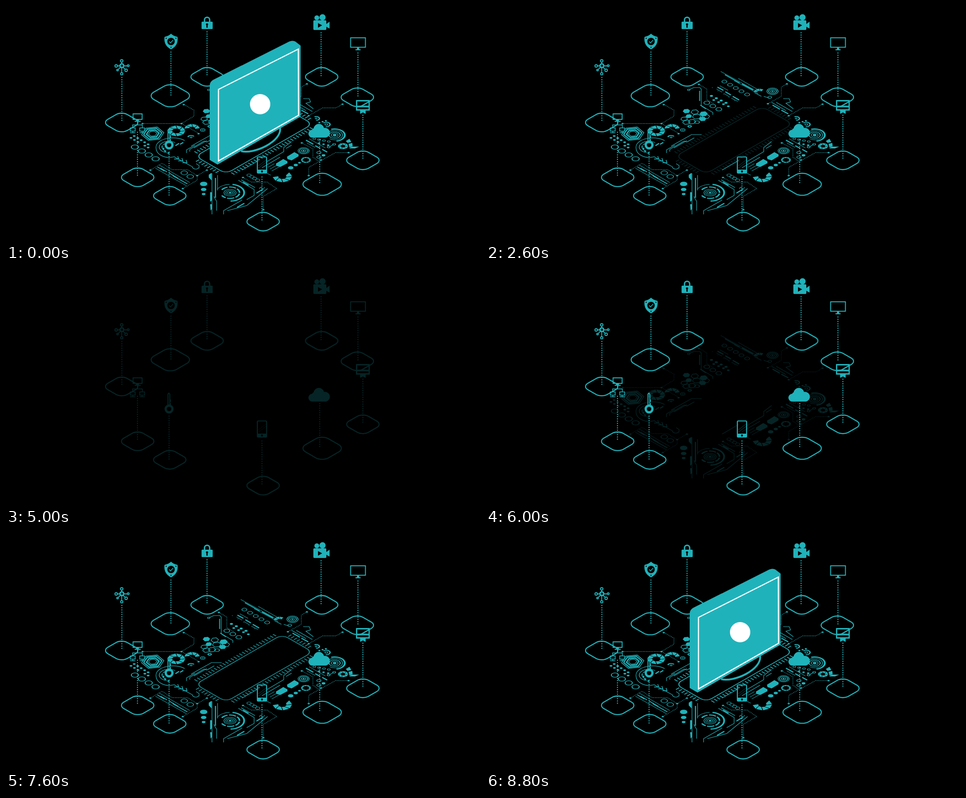
Animation, 1024 px wide and 512 px high, one loop 9300 ms. Source, as an HTML page:

```html
<!DOCTYPE html>
<html lang="en">
<head>
<meta charset="utf-8">
<title>Isometric circuit</title>
<style>
  html, body { margin: 0; width: 100%; height: 100%; overflow: hidden; background: #000; }
  svg { display: block; width: 100%; height: 100%; }
</style>
</head>
<body>
<svg id="stage" viewBox="0 0 1024 512"></svg>
<script>
const TEAL = '#20b2ba';

// Drawing helpers, each returning SVG markup
const line = (d, w = 1.2, extra = '') =>
  `<path d="${d}" fill="none" stroke="${TEAL}" stroke-width="${w}" ${extra}/>`;
const fill = (d, color = TEAL) => `<path d="${d}" fill="${color}"/>`;
const disc = (x, y, r, color = TEAL) => `<circle cx="${x}" cy="${y}" r="${r}" fill="${color}"/>`;
const hoop = (x, y, r, w) =>
  `<circle cx="${x}" cy="${y}" r="${r}" fill="none" stroke="${TEAL}" stroke-width="${w}"/>`;
const flat = (x, y, body) => `<g transform="translate(${x} ${y}) scale(1 .6)">${body}</g>`;
const spot = (x, y, r) => flat(x, y, disc(0, 0, r));
const ring = (x, y, r, w = 1.6) => flat(x, y, hoop(0, 0, r, w));
const arc = (x, y, r, w, from, to, dash = '') => {
  const at = deg => {
    const a = deg * Math.PI / 180;
    return `${(r * Math.cos(a)).toFixed(2)} ${(r * Math.sin(a)).toFixed(2)}`;
  };
  const large = to - from > 180 ? 1 : 0;
  return flat(x, y, line(`M${at(from)}A${r} ${r} 0 ${large} 1 ${at(to)}`, w, `stroke-dasharray="${dash}"`));
};
// Ring of slanted blades, like a camera aperture
const aperture = (x, y, inner, outer, count, first = 0, last = count) => {
  const at = (r, i) => {
    const a = i / count * 2 * Math.PI;
    return `${(r * Math.cos(a)).toFixed(1)} ${(r * Math.sin(a)).toFixed(1)}`;
  };
  let d = '';
  for (let i = first; i < last; i++)
    d += `M${at(outer, i)}L${at(outer, i + .88)} ${at(inner, i + 1.2)} ${at(inner, i + .35)}z`;
  return flat(x, y, fill(d));
};
const row = (n, x, y, dx, dy, draw) =>
  Array.from({ length: n }, (_, i) => draw(x + dx * i, y + dy * i)).join('');
const each = (points, draw) => points.map(p => draw(...p)).join('');
const hex = (x, y, r, w = 0) => {
  const d = `M${x - r} ${y + r * .1}l${r * .4} ${-r * .6} ${r} ${-r * .1} ${r * .6} ${r * .5} ${-r * .4} ${r * .6} ${-r} ${r * .1}z`;
  return w ? line(d, w) : fill(d);
};
const trace = (d, ...ends) =>
  line(d, 1.3, 'stroke-dasharray="1.4 2"') + each(ends, (x, y) => spot(x, y, 2.6));

// Icons, their stems and landing pads
const pad = (x, y, side, r) =>
  `<rect x="${-side / 2}" y="${-side / 2}" width="${side}" height="${side}" rx="${r}" fill="none"
    stroke="${TEAL}" stroke-width="2.3" vector-effect="non-scaling-stroke"
    transform="matrix(.866 .5 -.866 .5 ${x} ${y})"/>`;
const stem = (x, top, bottom) =>
  line(`M${x} ${top}V${bottom}`, 2.5, 'stroke-linecap="round" stroke-dasharray="0 4.9"');

const pads =
  each([[434.5, 153.7], [250, 252.7], [284.5, 371.7], [353.8, 411.8], [555.5, 467.8], [771, 334.8], [759, 198], [682, 153.7]],
    (x, y) => pad(x, y, 48.6, 14)) +
  each([[355, 194.8], [683, 386.8]], (x, y) => pad(x, y, 57.2, 16)) +
  each([[434.3, 56, 154], [356.3, 100, 198], [250.3, 155, 253], [284, 274, 371], [352.3, 317, 414],
    [553, 371, 468], [677.7, 290, 387], [771, 237, 335], [760.3, 102, 199], [680.7, 58, 155]], stem);

const lock = line('M428.8 36v-6a5.6 5.6 0 0 1 11.2 0v6', 3) +
  fill('M424 34h21q1.5 0 1.5 1.5v13q0 1.5-1.5 1.5h-21q-1.5 0-1.5-1.5v-13q0-1.5 1.5-1.5z') +
  disc(434.3, 40, 2.4, '#000') + fill('M433.3 40h2l.5 7h-3z', '#000');

const shield = fill('M356.5 60Q361 65 370.5 67Q373 86 356.5 94Q340 86 342.5 67Q352 65 356.5 60z') +
  disc(356.5, 77, 8, '#000') + line('M352.5 77l3 3 5.5-6', 1.6) +
  each([[346, 70], [367, 70], [356.5, 89.5]], (x, y) => disc(x, y, 1.2, '#000'));

const network = hoop(250.3, 129.5, 4, 3) +
  line('M250 122v4M241 130h5M254 130h8M247 133l-4 4M253 133l4 4M250 134v10', 1.8) +
  each([[250, 119, 2.7], [238, 130, 2.7], [264, 129.5, 2], [241, 139, 1.8], [259.5, 139.5, 2.7], [250, 147, 2.5]],
    (x, y, r) => hoop(x, y, r, 2));

const camera = disc(671.5, 25.5, 5.3) + disc(683.8, 24.5, 6.7) +
  fill('M666 31h24q2 0 2 2v17q0 2-2 2h-24q-2 0-2-2v-17q0-2 2-2zM692 39l7-5v15l-7-4z') +
  fill('M674 37l9 5-9 5z', '#000');

const television = line('M744.5 69h32v20.5h-32z', 2) + fill('M758 90h5v4h3v2h-11v-2h3z');

const certificate = line('M757.5 205.5h27v20h-27z', 2.8) + line('M757 218h28', 3.5) +
  line('M767 217l17-10', 1.3) + fill('M765 225h12v9l-6-3-6 3z');

const computers = line('M274.5 234h19.5v12h-19.5z', 1.9) + fill('M281 247h6v2h4v2h-13v-2h3z') +
  line('M284 251v7M273.5 264v-6h21v6M268.5 264.5h10.5v7h-10.5zM289 264.5h10.5v7h-10.5z', 1.6) +
  line('M268 275h11.5M288.5 275h11.5M274 272v3M294 272v3', 1.5);

const key = hoop(352.3, 301.5, 7.3, 5) +
  line('M350 294v-25l2-2 2 3v24', 2) + line('M355 281v5M355 289v4', 2);

const phone = line('M545 327.5h16q2 0 2 2v31q0 2-2 2h-16q-2 0-2-2v-31q0-2 2-2z', 2.2) +
  fill('M542 355h22v7h-22z') + disc(553, 359, 2.2, '#000') +
  line('M545 347l17-13M545 352l17-13', .4);

const cloud = fill('M662 285.5a8.5 8.5 0 0 1-.5-17a4 4 0 0 1 3-3a11.5 11.5 0 0 1 22.5-1a10.5 10.5 0 0 1 4 21z');

const icons = pads + lock + shield + network + camera + television + certificate + computers + key + phone + cloud;

// Circuit board, by region
const traces =
  trace('M385 214L406 226V239L379 255', [384, 214], [379, 255]) +
  trace('M295 255H379L416 276', [295, 255], [416, 277]) +
  trace('M460 170L477 180V203L492 212', [460, 170]) +
  trace('M650 169L638 176V196L609 212', [650, 169], [609, 212]) +
  trace('M727 213L713 221H684L654 238', [727, 213], [654, 238]) +
  trace('M312 356L337 341L359 355H392L413 368L434 356', [312, 356], [413, 368], [434, 356]) +
  trace('M382 396L413 378V368', [382, 396]) +
  trace('M512 372L530 382H564L585 396L556 413V442', [512, 372], [556, 442]) +
  trace('M639 297L663 310V328L677 338', [639, 297]) +
  trace('M740 318H712L654 350V368', [740, 318], [654, 368]);

const topLeft =
  line('M507 142L580 182M545 157L592 184M536 162L588 190', 1) + line('M516 149L548 167M553 169L577 182', 2) +
  line('M580 188L595 196M600 196L612 200') + ring(613, 198, 4) +
  row(5, 515, 164, 12.3, 7, (x, y) => ring(x, y, 5.3)) +
  line('M500 176L513 183M517 186L529 193M533 196L547 204', 2.5) +
  line('M505 173L523 183M498 180L510 187M514 190L526 197M530 200L544 207', 1) +
  row(4, 487, 195, 10.5, 5, (x, y) => spot(x, y, 3.4)) + row(4, 492, 204, 10.5, 4.5, (x, y) => spot(x, y, 3)) +
  row(5, 489, 177, 12, 7, (x, y) => spot(x, y, 1)) +
  row(3, 477, 210, 13, 7, (x, y) => ring(x, y, 6.3)) +
  ring(438, 182, 2.5) + line('M440 181L449 177H462L465 180V216L490 231V236') +
  line('M461.5 184V206M463 215L475 223', 2) +
  aperture(591, 187, 5, 13, 8, 4, 7) +
  each([[12, 1.5], [8.5, 2], [4.5, 1.5]], (r, w) => ring(619, 185, r, w)) + spot(619, 185, 2) +
  line('M627 209L662 229M617 209L648 227M642 201H655L658 208L648 211L664 223') +
  line('M619 215L635 224M638 226L653 234', 2.3);

const hexagons =
  each([[433, 228, 8], [470, 234, 9], [438, 239, 7], [468, 245, 8]], (x, y, r) => hex(x, y, r)) +
  each([[451, 230, 8], [455, 240, 9], [428, 245, 7], [475, 240, 8], [433, 252, 8], [445, 251, 8]],
    (x, y, r) => hex(x, y, r, 1.3)) +
  ring(456, 252, 5, 2) + ring(440, 261, 3.5, 2.5) + ring(425, 269, 5, 1.5) + ring(425, 269, 2, 1);

const left =
  hex(317, 277, 24, 1.5) + hex(317, 277, 19.5, 2.4) + hex(317, 277, 13.5, 2.8) + hex(317, 277, 9, 1.3) +
  aperture(368, 271, 9, 19.5, 8) +
  aperture(402, 266, 7, 17, 8, 4, 8) +
  arc(400, 285, 7, 3, 190, 330) + ring(400, 285, 2, 1.5) +
  row(3, 270, 286, 7.5, 4.5, (x, y) => spot(x, y, 3)) + row(5, 277, 282, 7.5, 4.5, (x, y) => spot(x, y, 3)) +
  row(2, 300, 303, 7, 4, (x, y) => spot(x, y, 3)) +
  row(4, 278.5, 306, 14.9, 8.5, (x, y) => ring(x, y, 7.8, 2)) +
  line('M386 292C365 280 324 287 324 307C324 323 344 332 363 327L403 349V351Q410 357 417 351V346L411 342') +
  arc(352, 306, 21, 1.5, 100, 310) + arc(352, 306, 15, 2, 120, 290, '9 3') +
  line('M366 303L374 298M376 300L383 296', 2.5) +
  each([[340, 309], [344, 315], [351, 319]], (x, y) => spot(x, y, 2.5)) +
  row(3, 363, 332, 9, 4, (x, y) => line(`M${x} ${y}L${x + 10} ${y}L${x + 8} ${y - 6}`, 1.6)) +
  line('M331 345L397 383M323 352L390 390', 1) +
  line('M334 352L348 360M352 362L372 374M327 349L342 358M360 368L392 386', 1.8) +
  ring(385, 362, 7) + ring(398, 370, 7) +
  line('M390 319V312L408 302M397 316V311L428 293L434 295L450 286M400 304L444 279H466M406 308L434 292');

const bottom =
  each([[427, 386, 8], [427, 398, 6], [427, 408, 4]], spot) +
  line('M445 363V452M457 367V400M449 413L455 424V444') + line('M452.5 373V416', 2.4) +
  fill('M438 366L444 362V378L438 372zM441 404h4v16l-2 4h-2zM441 430h4v10l-3 4z') +
  spot(484, 405, 3) + each([[6, 1.4], [9.5, 1.4], [13, 1.4]], (r, w) => ring(484, 405, r, w)) +
  arc(484, 405, 20.5, 3.6, -150, 150, '16 3') + arc(484, 405, 30.5, 4, -80, 88) + arc(484, 405, 30, 1.3, 205, 268) +
  line('M502 378L536 398V411L520 420M470 452V444L510 421M478 444L520 433L565 396M508 377L538 394') +
  line('M512 382L524 389M499 437L515 428M541 406L554 398', 2.4) +
  row(4, 525, 367, 6.2, 3.6, (x, y) => ring(x, y, 4.5, 1.3)) +
  line('M547 396L551 393L555 398L559 393');

const lowerRight =
  line('M510 356L546 335M563 338L600 316V307L617 294M553 351L592 328M605 309L617 302') +
  line('M566 350L580 342M570 354L584 346M574 358L592 348M562 362L572 367', 1) +
  fill('M583 342L599 332L608 337V341L593 349L584 347zM607 327L623 317L632 322V326L617 335L608 332z') +
  each([[615, 351, 6], [626, 345, 4.5], [634, 340, 3]], spot) +
  each([[12, 1.3], [9, 2], [5, 1.8]], (r, w) => ring(643, 314, r, w)) + spot(643, 314, 2.5) +
  aperture(648, 334, 7, 11, 9) +
  aperture(597, 370, 9, 21, 8, -1, 4);

const right =
  line('M648 291L664 300M668 303L679 309M683 311L694 317', 2.5) + line('M655 288L690 308M650 297L668 307', 1) +
  ring(676, 318, 4.5, 1.6) + ring(676, 328, 4.5, 1.6) + spot(686, 324, 4) + spot(681, 334, 2.5) +
  row(4, 666, 288, 10.5, 2, (x, y) => ring(x, y, 3, 1.3)) + row(3, 676, 298, 10, 2, (x, y) => spot(x, y, 2.8)) +
  ring(697, 306, 3) + line('M699 305L707 301') + ring(709, 300, 3) +
  arc(670, 244, 7, 3, -120, 90) + ring(670, 244, 2, 1.5) + arc(692, 257, 8, 3, -140, 100) + ring(692, 257, 3, 1.5) +
  row(3, 677, 253, 7, -2, (x, y) => spot(x, y, 2.4)) +
  arc(710, 280, 22, 4, -110, 80) + arc(710, 280, 17, 1.5, -160, 130) +
  each([[12, 2], [7.5, 1.5]], (r, w) => ring(710, 280, r, w)) + spot(710, 280, 4) +
  aperture(728, 304, 5, 11.5, 7) +
  fill('M734 293L742 288L746 295L738 297zM740 299L748 297L749 304L742 307zM741 309L747 305L763 305L754 309z');

const board = traces + topLeft + hexagons + left + bottom + lowerRight + right;

// Chip in its own isometric axes: x runs down-right, y runs down-left
const pins = d => line(d, 8, 'stroke-dasharray="1.9 5.1"');
const chip = `<g transform="matrix(.866 .5 -.866 .5 536 291)">
  <rect x="-38" y="-108" width="76" height="216" rx="14" fill="none" stroke="${TEAL}" stroke-width="1.8"/>
  ${pins('M-46-98V100M46-98V100M-27-115H29M-27 115H29')}</g>`;

const monitor =
  line('M508 315C536 322 597 294 592 264', 4) +
  fill('M440 334V173Q440 164 448 160L612 77Q619 74 625 77L636.5 86V240L457 344z') +
  `<path d="M459 181L631.5 93.5L632 237L459 336z" fill="none" stroke="#fff" stroke-width="2.5"/>` +
  disc(549, 213, 22, '#fff');

// Leave and return times in ms; one opacity step every 100 ms
const layers = [
  { art: board, leave: 2900, leaveSteps: 10, back: 5900 },
  { art: chip, leave: 1900, leaveSteps: 10, back: 6900 },
  { art: icons, leave: 3900, leaveSteps: 10, back: 4900 },
  { art: monitor, leave: 1000, leaveSteps: 9, back: 7900 },
];
const LOOP = 9300;
const stage = document.getElementById('stage');
stage.innerHTML = layers.map(layer => `<g>${layer.art}</g>`).join('');

const progress = (t, start, steps) =>
  Math.min(1, Math.max(0, (Math.floor((t - start) / 100) + 1) / steps));

const startTime = performance.now();
function render(now) {
  const t = Math.max(0, now - startTime) % LOOP;
  layers.forEach(({ leave, leaveSteps, back }, i) => {
    const opacity = 1 - progress(t, leave, leaveSteps) + progress(t, back, 10);
    stage.children[i].setAttribute('opacity', opacity.toFixed(3));
  });
  requestAnimationFrame(render);
}
render(startTime);
</script>
</body>
</html>
```
